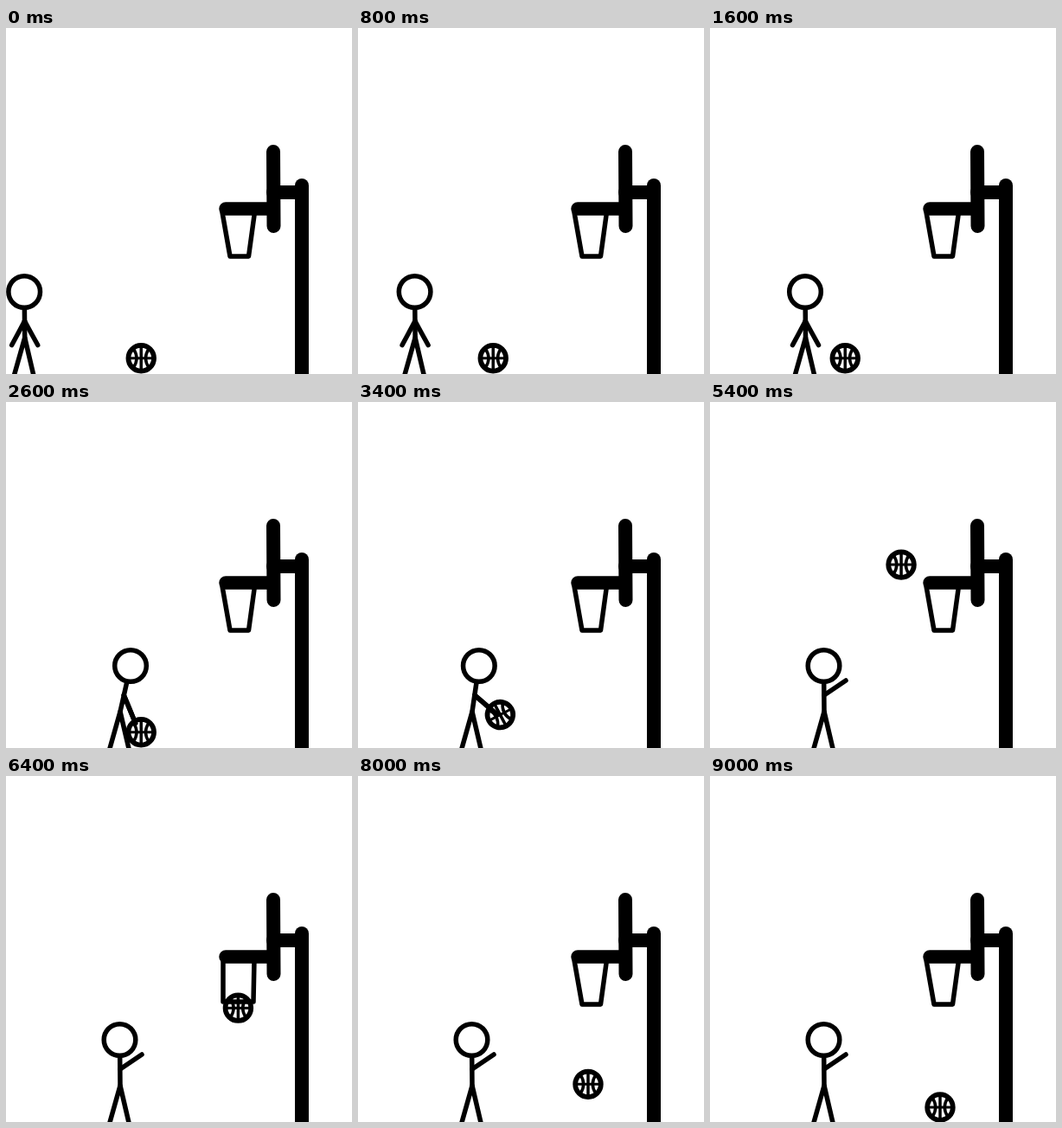
Write an HTML page with a canvas that moves like this. It is 400x400 px and loops after 9400 ms.

```html
<!DOCTYPE html>
<html lang="en">
<head>
<meta charset="utf-8">
<title>Free throw</title>
<style>
  html, body { margin: 0; width: 100%; height: 100%; overflow: hidden; background: #fff; }
  canvas { display: block; }
</style>
</head>
<body>
<canvas width="400" height="400"></canvas>
<script>
const ctx = document.querySelector('canvas').getContext('2d');
const LOOP = 9400, STEP = 200;
const ARRIVE = 2000, GRAB = 2600, LIFT = 3000, RELEASE = 4700, HOOP = 6000;
const LANDING = 6800, SECOND = 8175, END = 9000, FLOOR = 383;
const LIMB = 5.5;

const lerp = (a, b, k) => a + (b - a) * k;
const mix = (p, q, k) => [lerp(p[0], q[0], k), lerp(p[1], q[1], k)];
const ramp = (t, from, to) => Math.max(0, Math.min(1, (t - from) / (to - from)));

function line(width, ...points) {
  ctx.lineWidth = width;
  ctx.beginPath();
  points.forEach(p => ctx.lineTo(...p));
  ctx.stroke();
}

function ring(x, y, r, width) {
  ctx.lineWidth = width;
  ctx.beginPath();
  ctx.arc(x, y, r, 0, 7);
  ctx.fill();
  ctx.stroke();
}

// The held ball swings up around the shoulder.
function heldBall(t) {
  const k = ramp(t, LIFT, RELEASE);
  const angle = lerp(61, -45, k) * Math.PI / 180;
  const r = 32 + 18 * (1 - k) ** 3;
  return [132 + r * Math.cos(angle), 338 + r * Math.sin(angle)];
}

function bounce(t, from, to, height) {
  const k = ramp(t, from, to);
  return FLOOR - height * 4 * k * (1 - k);
}

function ballAt(t) {
  if (t <= RELEASE) return heldBall(t);
  if (t <= HOOP) {
    const k = ramp(t, RELEASE, HOOP), [x, y] = heldBall(RELEASE), top = 183, apex = 0.67;
    return [lerp(x, 278, k), top + (y - top) * (1 - k / apex) ** 2];
  }
  const x = lerp(278, 266, ramp(t, HOOP, 6500));
  if (t <= LANDING) return [x, lerp(215, FLOOR, ramp(t, HOOP, LANDING) ** 1.66)];
  return [x, t <= SECOND ? bounce(t, LANDING, SECOND, 60) : bounce(t, SECOND, END, 17)];
}

function drawBall([x, y], angle) {
  ctx.save();
  ctx.translate(x, y);
  ctx.rotate(angle);
  ring(0, 0, 14.8, 5.8);
  line(3, [-13, 0], [13, 0]);
  line(3.5, [0, -13], [0, 13]);
  for (const side of [-1, 1]) {
    ctx.beginPath();
    ctx.moveTo(side * 9, -11);
    ctx.quadraticCurveTo(side * 1.5, 0, side * 9, 11);
    ctx.stroke();
  }
  ctx.restore();
}

function drawHoop(stretched) {
  line(16, [309, 143], [309.5, 229]);
  line(16, [309, 190], [342, 190]);
  line(16, [342, 182], [342, 420]);
  line(15.5, [254, 209], [309, 209]);
  if (stretched) line(LIMB, [251, 213], [251, 261], [286, 261], [287, 213]);
  else line(LIMB, [250, 213], [259, 264], [280.5, 264], [287.5, 213]);
}

// Two equal bones; the elbow drops when the hand comes close.
function drawArm(shoulder, hand) {
  const dx = hand[0] - shoulder[0], dy = hand[1] - shoulder[1];
  const length = Math.hypot(dx, dy), reach = Math.min(length, 35);
  const bend = Math.sqrt(Math.max(0, 14.8 ** 2 - reach ** 2 / 4)) / length;
  const [x, y] = mix(shoulder, hand, reach / length / 2);
  line(LIMB, shoulder, [x - dy * bend, y + dx * bend], mix(shoulder, hand, reach / length));
}

function drawScene(t) {
  const hip = [Math.min(21.7 + t * 0.0555, 132), 358];
  const lean = 12.5 * (ramp(t, ARRIVE, 2400) - ramp(t, 3300, 3600));
  const head = [hip[0] - 0.5 + lean, 305];
  const shoulder = mix(head, hip, 0.64);
  const ball = ballAt(t), held = ramp(t, LIFT, RELEASE);

  line(LIMB, mix(head, hip, 0.34), hip);
  line(LIMB, [hip[0] - 17.5, 420], hip, [hip[0] + 14.5, 420]);
  ring(...head, 18.3, LIMB);
  drawBall(ball, t < RELEASE ? -Math.sqrt(held) : 0);

  if (t < RELEASE) {
    const grip = [ball[0] - 4, ball[1] - 4 + 14 * held];
    const grab = ramp(t, ARRIVE, GRAB);
    for (const side of [-15, 15]) drawArm(shoulder, mix([hip[0] + side, 366.5], grip, grab));
  } else {
    drawArm(shoulder, [157, 322]);
  }
  drawHoop(t > HOOP && t < 6600);
}

const start = performance.now();
function tick() {
  const now = (performance.now() - start) % LOOP;
  ctx.fillStyle = '#fff';
  ctx.strokeStyle = '#000';
  ctx.lineCap = ctx.lineJoin = 'round';
  ctx.fillRect(0, 0, 400, 400);
  drawScene(Math.min(END, Math.floor(now / STEP) * STEP));
  requestAnimationFrame(tick);
}
tick();
</script>
</body>
</html>
```
